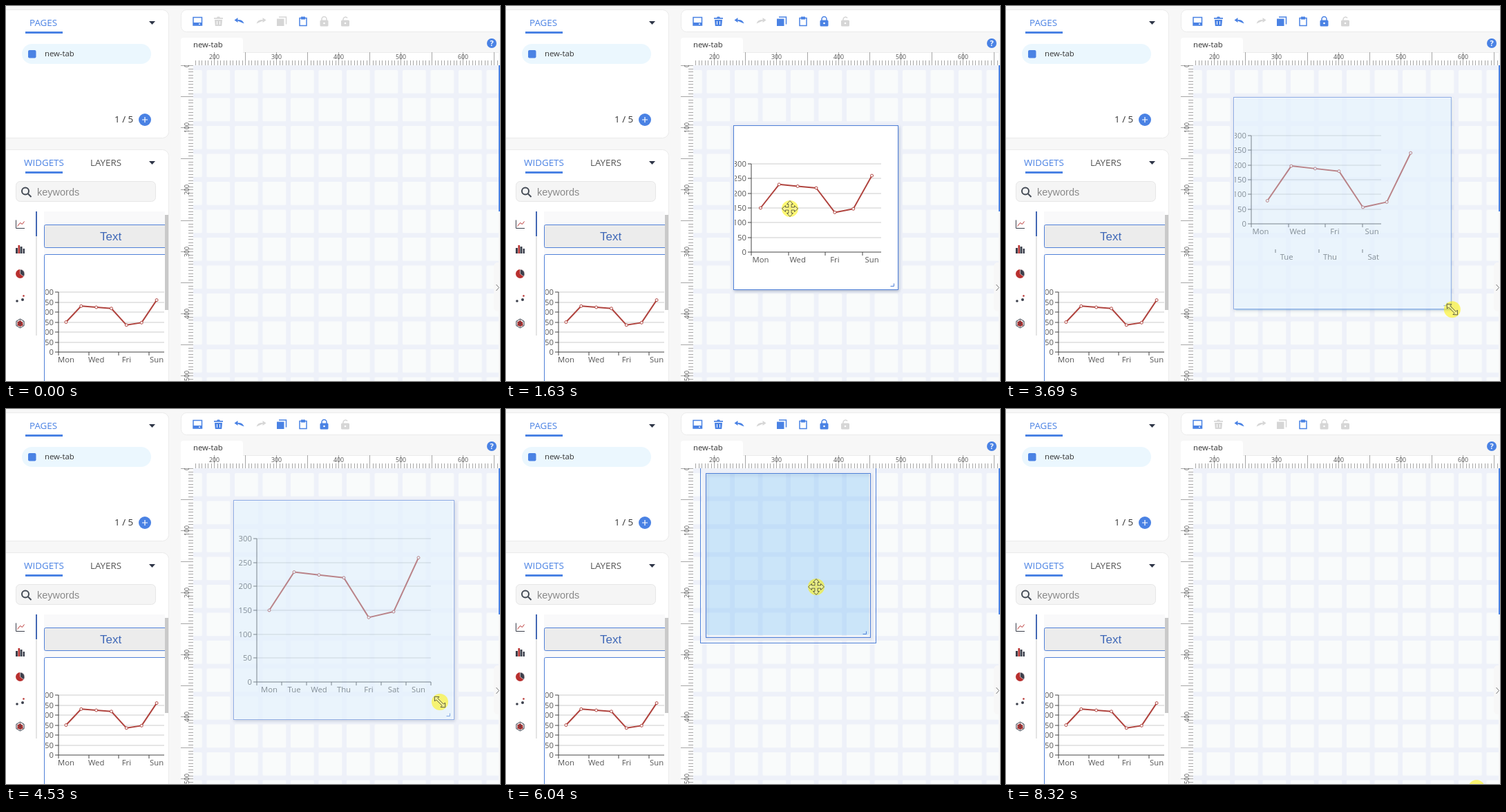
Write an HTML page that moves like this. It is 715 px wide and 544 px high and loops after 8.39 s.

```html
<!DOCTYPE html>
<html lang="en">
<head>
<meta charset="utf-8">
<title>Dashboard editor</title>
<style>
  html, body { margin: 0; width: 100%; height: 100%; overflow: hidden; background: #f7f7f7; }
  #stage { display: block; width: 715px; height: 544px; font-family: "Open Sans", "Noto Sans", sans-serif; }
  .plain { font-family: "Liberation Sans", Arial, sans-serif; }
  .panel { fill: #fff; stroke: #ebebeb; }
  .blue { fill: #4a82e4; }
  .head { font-size: 13.4px; }
  .small { font-size: 11.3px; fill: #333; }
  .label { font-size: 11.3px; fill: #555; }
  .unit { font-size: 8.8px; fill: #555; text-anchor: middle; }
  .tick { stroke: #a6a6a6; fill: none; }
  .axis { stroke: #444; fill: none; }
  .rule { stroke: #ccc; fill: none; }
  .series { stroke: #b0443f; stroke-width: 2; fill: none; stroke-linejoin: round; }
  .dot { stroke: #b0443f; fill: #fff; }
  .frame { stroke: #4f80d8; fill: none; }
  .slot { fill: rgba(65, 163, 243, .25); }
  .lift { filter: drop-shadow(1px 2px 2px rgba(60, 80, 120, .35)); }
  .halo { fill: #fff200; fill-opacity: .55; }
  .pointer { fill: #fff; fill-opacity: .25; stroke: #55553a; stroke-width: .9; stroke-linejoin: round; }
  .arrow { fill-opacity: 1; }
  .icon { --c: #4a82e4; fill: var(--c); }
  .icon .line { fill: none; stroke: var(--c); stroke-width: 1.5; }
  .off { --c: #d6d6d6; }
  .dark { fill: #3c404c; }
  .red { fill: #b8302f; }
</style>
</head>
<body>
<svg id="stage" viewBox="0 0 715 544">
  <defs>
    <pattern id="cells" x="290.5" y="93" width="40.5" height="40.5" patternUnits="userSpaceOnUse">
      <rect width="40.5" height="40.5" fill="#eef1f9"/>
      <rect width="33.8" height="33.8" rx="1.5" fill="#f9fbfb"/>
    </pattern>
    <clipPath id="board"><rect x="271" y="86" width="442" height="458"/></clipPath>
    <path id="caret" d="M-4.5 -2.5h9L0 2.5z" fill="#2d3446"/>
    <g id="lock"><rect x="-6" y="-1.5" width="12" height="9" rx="1.5"/><circle cy="3" r="1.3" fill="#fff"/></g>
    <g id="turn"><path class="line" d="M-5 -1.5q9 -2 11.5 5"/><path d="M-7.5 -1.5l5 -3.5v7z"/></g>
  </defs>

  <!-- pages panel -->
  <rect class="panel" x="-12" y="5.5" width="247.5" height="186" rx="9"/>
  <text class="head blue" x="34" y="29">PAGES</text>
  <rect class="blue" x="28" y="37" width="54" height="3"/>
  <use href="#caret" x="211.5" y="24.5"/>
  <rect x="23" y="55" width="187" height="29" rx="14.5" fill="#ebf7fe"/>
  <rect class="blue" x="32" y="64" width="11.5" height="11.5" rx="2"/>
  <text class="small" x="56" y="73">new-tab</text>
  <text class="head" x="157" y="169" fill="#333">1 / 5</text>
  <circle class="blue" cx="201" cy="165" r="9"/>
  <path d="M197 165h8M201 161v8" stroke="#fff" stroke-width="1.2"/>

  <!-- widgets panel -->
  <rect class="panel" x="-12" y="208.5" width="247.5" height="360" rx="9"/>
  <text class="head blue" x="26" y="232">WIDGETS</text>
  <rect class="blue" x="28" y="240" width="54" height="3"/>
  <text class="head" x="122" y="232" fill="#555">LAYERS</text>
  <use href="#caret" x="211.5" y="227.5"/>
  <rect x="14.5" y="254.5" width="202" height="29" rx="6" fill="#f5f5f5" stroke="#e6e6e6"/>
  <g fill="none" stroke="#444b55" stroke-width="2"><circle cx="28" cy="268.5" r="5"/><path d="M32 272.5l4.5 4.5"/></g>
  <text class="plain" x="45" y="275" font-size="14.5" fill="#8a8a8a">keywords</text>
  <rect x="43" y="334" width="2" height="144" fill="#e4e4e4"/>
  <rect x="43" y="298" width="2" height="36" fill="#4468b4"/>

  <!-- widget kinds -->
  <g transform="translate(20.5 316.5)" fill="none"><path d="M-6 -6V6H6.500" stroke="#3c404c"/><path d="M-4 3l4 -5 3 2 3 -4" stroke="#b8302f"/></g>
  <g transform="translate(20.5 353)"><path class="dark" d="M-6.500 -2h3v8h-3zM0 -4h3v10h-3zM4 -1h2.500v7h-2.500z"/><path class="red" d="M-3 -6h2.500v12h-2.500z"/></g>
  <g transform="translate(20.5 388.5)"><circle class="red" r="6.500"/><path class="dark" d="M0 0V-6.500A6.500 6.500 0 0 1 5 4z" stroke="#fff" stroke-width=".6"/></g>
  <g transform="translate(20.5 425)"><circle class="dark" cx="-4.500" cy="3" r="1.800"/><circle class="dark" cx="3.500" cy="1" r="2"/><circle class="red" cx="5" cy="-4.500" r="1.300"/></g>
  <g transform="translate(20.5 460.5)"><path d="M0 -6.500L5.600 -3.200V3.200L0 6.500L-5.600 3.200V-3.200z" fill="#fff" stroke="#3c404c"/><path class="red" d="M0 -4.500L4 -1V3L0 4.500L-4 3V-2z"/><path d="M0 -6V6M-5 -3L5 3M-5 3L5 -3" stroke="#3c404c" stroke-width=".6"/></g>

  <svg x="55" y="298" width="175" height="246" viewBox="55 298 175 246">
    <rect x="55" y="298" width="175" height="246" fill="#f9f9fa"/>
    <rect class="frame" x="55.5" y="317.5" width="194" height="33" rx="2" style="fill:#ececec"/>
    <text class="plain" x="136" y="340" font-size="17" fill="#4069b8">Text</text>
    <g id="sample"></g>
  </svg>
  <rect x="230" y="303" width="5" height="138" fill="#c9c9c9"/>

  <!-- toolbar -->
  <rect class="panel" x="253.5" y="5.5" width="480" height="32" rx="8"/>
  <g class="icon" transform="translate(277 22)"><path class="line" d="M-6 -5.500H6.500V6H-6z"/><path d="M-6 2H6.500V6H-6z"/><path d="M2 3.500h2V5H2z" fill="#fff"/></g>
  <g class="icon pick" transform="translate(307.5 22)"><path d="M-6.500 -5h4l1 -1.500h3l1 1.500h4v1.800h-13zM-5.500 -2h11l-.8 9h-9.400z"/><path d="M-2 0V5M2 0V5" stroke="#fff"/></g>
  <g class="icon" transform="translate(338 22)"><use href="#turn"/></g>
  <g class="icon off" transform="translate(369 22) scale(-1 1)"><use href="#turn"/></g>
  <g class="icon pick" transform="translate(399 22)"><path d="M-7 -3.500H3.500V7H-7z"/><path class="line" d="M-4 -6H6.500V4.500"/></g>
  <g class="icon" transform="translate(430 22)"><path class="line" d="M-5 -4.500H5V6.500H-5z"/><path d="M-3 -6.500H3V-2.500H-3z"/></g>
  <g class="icon pick" transform="translate(460.5 22)"><use href="#lock"/><path class="line" d="M-3.500 -1V-3a3.500 3.500 0 0 1 7 0v2"/></g>
  <g class="icon off" transform="translate(491 22)"><use href="#lock"/><path class="line" d="M-3 -1V-3a3.300 3.300 0 0 1 6 -1.500"/></g>

  <!-- board -->
  <path d="M253 67V50q0-4 4-4h82q4 0 4 4v17zM253 67h460v477h-460z" fill="#fff"/>
  <path d="M343 67.5h370" stroke="#ececec"/>
  <text class="small" x="271" y="60">new-tab</text>
  <circle class="blue" cx="703" cy="54" r="7"/>
  <text x="703" y="58" font-size="11" font-weight="700" fill="#fff" text-anchor="middle">?</text>
  <rect x="271" y="86" width="442" height="458" fill="url(#cells)"/>
  <svg x="271" y="67" width="442" height="19" viewBox="271 67 442 19"><g id="across"></g></svg>
  <svg x="253" y="86" width="18" height="458" viewBox="253 86 18 458"><g id="down"></g></svg>
  <g id="live" clip-path="url(#board)"></g>
  <rect class="blue" x="713" y="86" width="2" height="212"/>
  <path d="M715 372h-5q-4 2-4 6v59q0 4 4 6h5z" fill="#f7f7f7"/>
  <path d="M709.5 404l4 4.500-4 4.500" fill="none" stroke="#777"/>
  <g id="ghost"></g>
  <g id="cursor"></g>
</svg>

<script>
const LOOP = 8390, ENTER = 110, PICK = 950, DROP = 1450, REMOVE = 7000;
const DRAGS = [{ from: 1910, to: 2500 }, { from: 5400, to: 6350 }];
const RESIZES = [{ from: 3410, to: 3960 }, { from: 4480, to: 4960 }];
const X = 329.5, TOP = 173.5, HOME = 132.5, SIZE = 238, LARGE = 319;
const CELL = 40.5;
const DAYS = ["Mon", "Tue", "Wed", "Thu", "Fri", "Sat", "Sun"];
const VALUES = [150, 230, 224, 218, 135, 147, 260];

// Where the hand turns or rests: time, x, y.
const STOPS = [
  [ENTER, 657, 556], [900, 93, 400], [1400, 366, 203], [1630, 411, 294], [1910, 399, 273],
  [2130, 392, 354], [2500, 392, 232], [2720, 569, 371], [3410, 569, 371], [3620, 642, 437],
  [3850, 659, 451], [4480, 628, 425], [4540, 628, 425], [4880, 548, 345], [5400, 489, 297],
  [6040, 449, 258], [6350, 489, 297], [6950, 307, 24], [7300, 307, 24], [7990, 666, 540], [8320, 681, 550]
];

const $ = id => document.getElementById(id);
const mix = (a, b, k) => a + (b - a) * k;
const during = (t, { from, to }) => t >= from && t < to;
const snap = (v, origin) => origin + CELL * Math.round((v - origin) / CELL);

function hand(t) {
  const next = STOPS.findIndex(s => s[0] > t);
  const b = STOPS.at(next), a = next > 0 ? STOPS[next - 1] : b;
  const k = a === b ? 0 : (t - a[0]) / (b[0] - a[0]);
  const e = k * k * (3 - 2 * k);
  return { x: mix(a[1], b[1], e), y: mix(a[2], b[2], e) };
}

// The widget's box: it follows the hand while held and snaps on release.
function box(t) {
  const [grow, shrink] = RESIZES;
  const large = t >= grow.to && t < shrink.to;
  const b = { x: X, y: t < DRAGS[0].to ? TOP : HOME, w: large ? LARGE : SIZE, h: large ? LARGE - 1 : SIZE };
  const held = [...DRAGS, ...RESIZES].find(g => during(t, g));
  if (!held) return b;
  const c = hand(t), grip = hand(held.from);
  const dx = c.x - grip.x, dy = c.y - grip.y;
  if (DRAGS.includes(held)) return { ...b, x: b.x + dx, y: b.y + dy };
  return { ...b, w: Math.max(SIZE, b.w + dx), h: Math.max(SIZE, b.h + dy) };
}

// The grid slot glides to each snapped place over 150 ms.
function slot(t) {
  const s = { x: 0, y: 0, w: 0, h: 0 }, n = 15;
  for (let i = 0; i < n; i++) {
    const b = box(t - i * 10);
    s.x += snap(b.x, 290.5) / n;
    s.y += snap(b.y, 93) / n;
    s.w += snap(b.w, 235) / n;
    s.h += snap(b.h, 235) / n;
  }
  return s;
}

function plot(w, h) {
  const l = Math.round(w * .1), r = Math.round(w * .9);
  return { l, r, t: 54, b: Math.round(h - 53), gap: (r - l) / 7 };
}

const rect = (cls, { x, y, w, h }, extra = "") =>
  `<rect class="${cls}" x="${x}" y="${y}" width="${w}" height="${h}" ${extra}/>`;
const inset = ({ x, y, w, h }, d) => ({ x: x + d, y: y + d, w: w - 2 * d, h: h - 2 * d });
const view = ({ x, y, w, h }, body) => `<svg x="${x}" y="${y}" width="${w}" height="${h}">${body}</svg>`;
const dayLabel = (i, p) =>
  `<text class="label" text-anchor="middle" x="${p.l + p.gap * (i + .5)}" y="${p.b + 15}">${DAYS[i]}</text>`;
const dayTick = (i, p) => `M${Math.round(p.l + p.gap * i)} ${p.b}v5`;

function axes(w, h) {
  const p = plot(w, h), skip = p.gap > 30 ? 1 : 2;
  let rules = "", ticks = "", text = "";
  for (let v = 0; v <= 300; v += 50) {
    const y = Math.round(mix(p.b, p.t, v / 300));
    if (v) rules += `M${p.l} ${y}H${p.r}`;
    ticks += `M${p.l - 5} ${y}h5`;
    text += `<text class="label" text-anchor="end" x="${p.l - 7}" y="${y + 4}">${v}</text>`;
  }
  for (let i = 0; i < 7; i += skip) {
    ticks += dayTick(i, p);
    text += dayLabel(i, p);
  }
  if (skip === 1) ticks += dayTick(7, p);
  return `<path class="rule" d="${rules}"/><path class="axis" d="${ticks}M${p.l} ${p.t}V${p.b}H${p.r}"/>${text}`;
}

function series(w, h) {
  const p = plot(w, h);
  const pts = VALUES.map((v, i) => [p.l + p.gap * (i + .5), mix(p.b, p.t, v / 300)]);
  return `<polyline class="series" points="${pts.join(" ")}"/>` +
    pts.map(([x, y]) => `<circle class="dot" cx="${x}" cy="${y}" r="2"/>`).join("");
}

// While stretched, the chart keeps its old axes; odd days and the line trail behind the box.
function stretching(w, h) {
  const at = k => [mix(SIZE - 3, w, k), mix(SIZE - 3, h, k)];
  const p = plot(...at(.53));
  const odd = [1, 3, 5].map(i => dayLabel(i, p) + `<path class="axis" d="${dayTick(i, p)}"/>`);
  return axes(...at(0)) + odd.join("") + series(...at(.88));
}

function sample(x, y) {
  const b = { x, y, w: 194, h: 197 };
  const inner = inset(b, 1.5);
  return rect("frame", b, 'rx="2" style="fill:#fff"') +
    view({ ...inner, y: inner.y - 1 }, axes(inner.w, inner.h) + series(inner.w, inner.h));
}

function rulers() {
  const across = { d: "", text: "" }, down = { d: "", text: "" };
  for (let u = 0; u <= 660; u += 5) {
    const x = Math.round(121 + u * .9) + .5, y = Math.round(86 + u * .9) + .5;
    across.d += `M${x} 86V${u % 50 ? 79 : 67}`;
    down.d += `M271 ${y}H${u % 50 ? 264 : 253}`;
    if (u % 100) continue;
    across.text += `<text class="unit" x="${x}" y="77">${u}</text>`;
    down.text += `<text class="unit" transform="translate(265 ${y}) rotate(-90)">${u}</text>`;
  }
  for (const [id, r] of Object.entries({ across, down }))
    $(id).innerHTML = `<path class="tick" d="${r.d}"/>${r.text}`;
}

function widget(t) {
  const b = box(t), inner = inset(b, 1.5);
  const drag = DRAGS.some(g => during(t, g)), resize = RESIZES.some(g => during(t, g));
  let out = drag || resize ? rect("slot", slot(t), 'rx="3"') : "";
  if (drag) out += rect("frame", inset(b, -8));
  const chart = drag ? "" : during(t, RESIZES[0])
    ? stretching(inner.w, inner.h)
    : axes(inner.w, inner.h) + series(inner.w, inner.h);
  return out + `<g opacity="${resize ? .6 : 1}">` +
    rect("frame lift", b, `style="fill:${drag ? "none" : "#fff"}"`) + view(inner, chart) +
    `<path class="frame" d="M${b.x + b.w - 6} ${b.y + b.h - 5}h-5m5 0v-4"/></g>`;
}

function pointer(t) {
  const shape = (d, turn = 0, cls = "") => `<path class="pointer ${cls}" transform="rotate(${turn})" d="${d}"/>`;
  if (during(t, { from: 2640, to: 5120 }))
    return shape("M-1.5 -6H-4.5L0 -11L4.5 -6H1.5V6H4.5L0 11L-4.5 6H-1.5Z", -45);
  if (during(t, { from: 1530, to: 6500 }))
    return [0, 90, 180, 270].map(a => shape("M-2 -2V-6.5H-4.5L0 -11.5L4.5 -6.5H2V-2", a)).join("");
  return shape("M0 0V15L3.5 12L6 17.5L8.5 16.5L6 11H11Z", 0, "arrow");
}

function draw(t) {
  const c = hand(t), placed = during(t, { from: DROP, to: REMOVE });
  $("live").innerHTML = placed ? widget(t) : "";
  $("ghost").innerHTML = during(t, { from: PICK, to: DROP })
    ? `<g opacity=".5">${sample(c.x - 38, c.y - 40)}</g>` : "";
  $("cursor").innerHTML = t < ENTER ? "" :
    `<g transform="translate(${c.x} ${c.y})"><circle class="halo" r="12"/>${pointer(t)}</g>`;
  document.querySelectorAll(".pick").forEach(e => e.classList.toggle("off", !placed));
}

rulers();
$("sample").innerHTML = sample(55.5, 360.5);
const start = performance.now();
function tick() {
  draw((performance.now() - start) % LOOP);
  requestAnimationFrame(tick);
}
tick();
</script>
</body>
</html>
```
